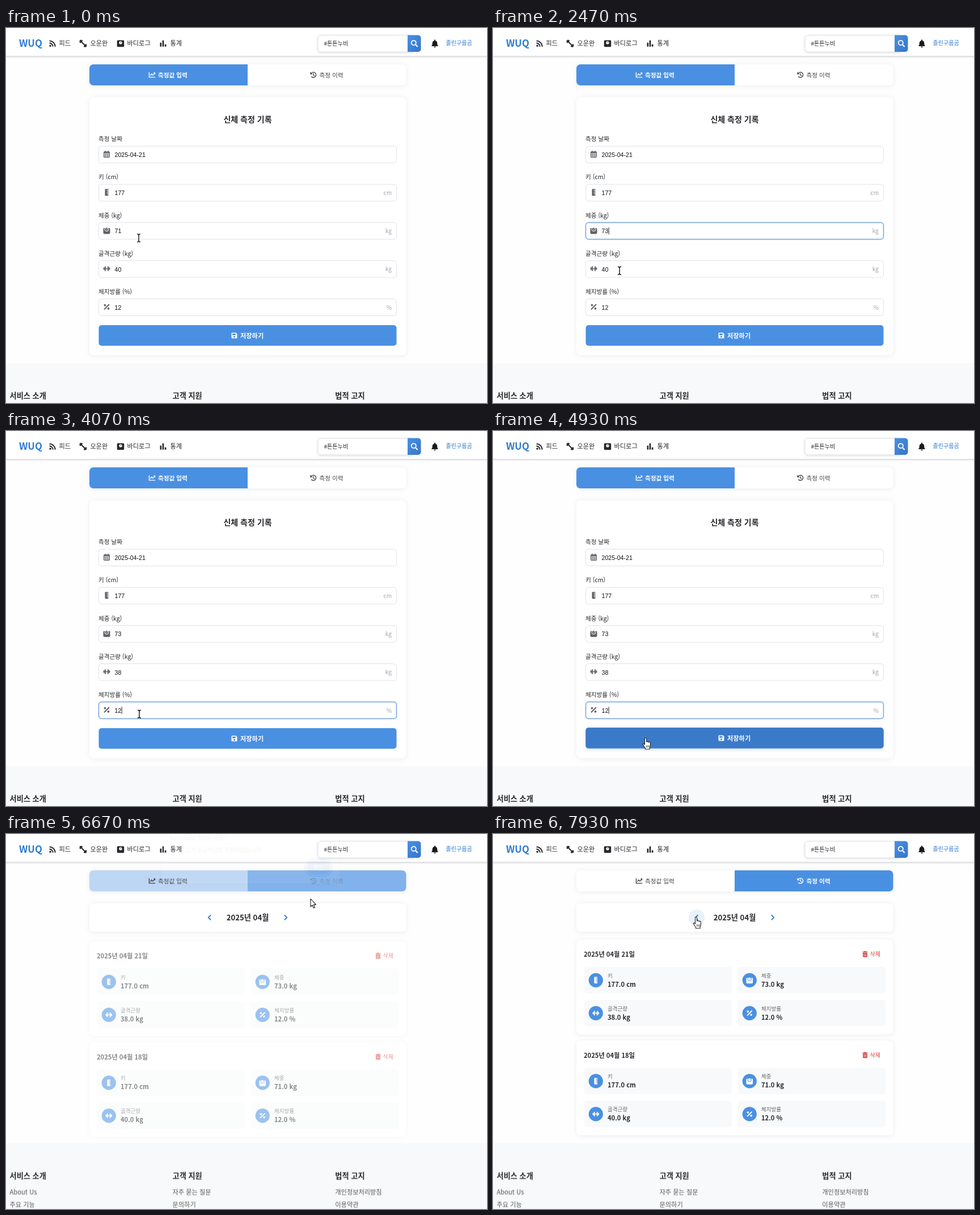
Write an HTML page that moves like this. It is 848 by 660 pixels and loops after 8000 ms.

```html
<!DOCTYPE html>
<html lang="ko">
<head>
<meta charset="utf-8">
<title>신체 측정 기록</title>
<style>
html, body { margin: 0; width: 100%; height: 100%; overflow: hidden; background: #fefefe; }
svg { display: block; width: 100vw; height: 100vh; }
text { font-family: "Noto Sans CJK KR", "Noto Sans CJK", "Noto Sans", sans-serif; white-space: pre; }
.value { font-family: "Liberation Sans", Arial, sans-serif; }
.line { fill: none; stroke: currentColor; stroke-width: 2; }
.card { fill: #fff; filter: drop-shadow(0 1px 4px rgba(20, 20, 60, .075)); }
.field { fill: #fff; stroke: #e0e2e8; }
.pop { fill: #fff; stroke: #d2d4d8; stroke-width: .7; filter: drop-shadow(0 2px 4px rgba(0, 0, 0, .28)); }
</style>
</head>
<body>
<svg id="stage" viewBox="0 0 848 660"></svg>
<script>
const LOOP = 8000, SWITCH = 6540;
const BLUE = '#4a90e2', DARK = '#26282c', GRAY = '#666';
const rules = [];

// Builds a looping keyframe rule from [ms, css] steps and wraps the content in it.
function animate(steps, content, ease = 'linear') {
  const name = `k${rules.length}`;
  const all = [...steps, [LOOP, steps.at(-1)[1]]];
  rules.push(`@keyframes ${name}{${all.map(([ms, css]) => `${ms / LOOP * 100}%{${css}}`).join('')}}`);
  return `<g style="animation:${name} ${LOOP}ms ${ease} infinite">${content}</g>`;
}
const shown = (from, to, content) =>
  animate([[0, 'opacity:0'], [from, 'opacity:1'], [to, 'opacity:0']], content, 'step-end');
const fade = (steps, content) => animate(steps.map(([ms, o]) => [ms, `opacity:${o}`]), content);
const slide = (steps, content) => animate(
  steps.map(([ms, o, y]) => [ms, `opacity:${o};transform:translate(0px,${y}px)`]), content);

// Text is placed by its left edge and the middle of its line.
const text = (x, y, size, str, fill = DARK, weight = 400, more = '') =>
  `<text x="${x}" y="${y + size * .37}" font-size="${size}" fill="${fill}" font-weight="${weight}" ${more}>${str}</text>`;
const rect = (x, y, w, h, r, more) =>
  `<rect x="${x}" y="${y}" width="${w}" height="${h}" rx="${r}" ${more}/>`;
const path = (d, more = '') => `<path d="${d}" ${more}/>`;
const line = (d, width = 2) => path(d, `class="line" style="stroke-width:${width}"`);
const dot = (x, y, r, more = '') => `<circle cx="${x}" cy="${y}" r="${r}" ${more}/>`;

// Icons live in a box from -8 to 8.
const icons = {
  feed: dot(-5, 5, 2.2) + line('M-7-1A8 8 0 0 1 1 7M-7-6A13 13 0 0 1 6 7', 2.5),
  lift: line('M-4-4L4 4', 2.6) + line('M-7.5-2L-2-7.5M2 7.5L7.5 2', 3.4) + line('M-8-5L-5-8M5 8L8 5', 2),
  body: rect(-8, -7.5, 16, 15, 2, '') + dot(0, -1.8, 3.4, 'fill="#fff"') + line('M0-1.5L1-4', 1.2),
  bars: path('M-7-2h3.4v9h-3.4zM-1.7-7h3.4v14h-3.4zM3.6 2H7v5H3.6z'),
  search: '<circle cx="-1.5" cy="-1.5" r="5" class="line" style="stroke-width:2.2"/>' + line('M2 2L7 7', 2.6),
  bell: path('M-1-8h2v2C5-5 5-1 5 1Q5 3 7 5H-7Q-5 3-5 1C-5-1-5-5-1-6zM-2 6H2A2 2 0 0 1-2 6z'),
  chart: line('M-7-6V6H8') + line('M-4 2L-1-2L2 1L7-4') + path('M3-5.5h5v5z'),
  history: line('M-5.2-3.5A6.4 6.4 0 1 1-5 4.2', 2) + path('M-8-7v6h6z') + line('M0-4V.5L3 3', 1.8),
  calendar: rect(-6.5, -5.5, 13, 13, 1.5, 'class="line" style="stroke-width:1.7"') +
    line('M-6-3.5H6', 3) + line('M-3.5-8v3M3.5-8v3') + line('M-6 1H6M-6 4.4H6M-2.2-2V7M2.2-2V7', 1.2),
  ruler: rect(-4, -8, 8, 16, 1.4, '') + path('M0-5.6H4v1.2H0zM1-2.6H4v1.2H1zM0 .4H4v1.2H0zM1 3.4H4v1.2H1z', 'fill="var(--back)"'),
  scale: rect(-8, -6, 16, 14, 2.4, '') + dot(0, -3, 5, 'fill="var(--back)"') + dot(0, -3, 3.7) +
    path('M-.6-2L1.4-6L2-5.6L.8-1.6z', 'fill="var(--back)"'),
  dumbbell: line('M-8 0H8') + line('M-6.4-3v6M6.4-3v6', 2.2) + line('M-3.4-5.5v11M3.4-5.5v11', 2.6),
  percent: line('M-6 6L6-6', 2.6) + line('M-6.5-4h5M-4-6.5v5M1.5 4h5M4 1.5v5', 2.6),
  save: path('M-7-5Q-7-7-5-7H4L7-4V5Q7 7 5 7H-5Q-7 7-7 5z') + path('M-4.6-4.8H3V-1H-4.6z', 'fill="var(--back)"') + dot(0, 3, 2.1, 'fill="var(--back)"'),
  trash: path('M-7-6.5h4L-2-8H2L3-6.5H7v2H-7zM-6-3.5H6V6.5Q6 8 4.5 8h-9Q-6 8-6 6.5z') + path('M-3-1v6.5M0-1v6.5M3-1v6.5', 'stroke="#fff" stroke-width="1.1"'),
  prev: line('M3-6L-3 0L3 6', 2.4),
  next: line('M-3-6L3 0L-3 6', 2.4)
};
const icon = (name, x, y, size, color = DARK, back = '#fff') =>
  `<g transform="translate(${x} ${y}) scale(${size / 16})" fill="${color}" style="color:${color};--back:${back}">${icons[name]}</g>`;

const header = () => rect(0, 0, 848, 50, 0, 'fill="#fff"') +
  rect(0, 49.5, 848, 1, 0, 'fill="#b9bac0"') + rect(0, 50.5, 848, 2, 0, 'fill="#f0f0f3"') +
  text(23, 27, 16.8, 'WUQ', '#2d7bd2', 700) +
  [['feed', 82, '피드', 93.5], ['lift', 136, '오운완', 148.5], ['body', 202, '바디로그', 213.5], ['bars', 277, '통계', 289.5]]
    .map(([name, x, label, tx]) => icon(name, x, 27.3, 12.5) + text(tx, 26.7, 11.2, label, DARK, 500)).join('') +
  rect(550, 13, 170, 29, 5, 'fill="#fff" stroke="#dfe1e6" style="filter:drop-shadow(0 1px 2px rgba(0,0,0,.13))"') +
  path('M708 12.5h18.5a5 5 0 0 1 5 5v19.5a5 5 0 0 1-5 5H708z', 'fill="url(#search)"') +
  icon('search', 720, 27.3, 13, '#fff') + text(560.5, 27.5, 10.08, '#튼튼누비') +
  icon('bell', 756, 27.5, 14, '#18191b') + text(775.5, 26.7, 10.08, '졸린구름곰', '#2d7bd2', 500);

const tabLabel = (name, x, label, color, weight) =>
  icon(name, x, 82.3, 11.5, color) + text(x + 10.5, 82.7, 10.64, label, color, weight);
const tabs = () => rect(147, 64, 558.5, 37, 7, 'class="card"') +
  fade([[0, 1], [SWITCH, 1], [6670, .37], [6750, 0]],
    path('M154 64H426V101H154a7 7 0 0 1-7-7V71a7 7 0 0 1 7-7z', `fill="${BLUE}"`)) +
  fade([[0, 0], [SWITCH, 0], [6670, .69], [6750, 1]],
    path('M426 64H698.5a7 7 0 0 1 7 7V94a7 7 0 0 1-7 7H426z', `fill="${BLUE}"`)) +
  shown(0, SWITCH, tabLabel('chart', 257.5, '측정값 입력', '#fff', 700)) +
  shown(SWITCH, LOOP, tabLabel('chart', 257.5, '측정값 입력', '#444', 400)) +
  fade([[0, 1], [SWITCH, 1], [6670, .3], [6750, 0]], tabLabel('history', 542, '측정 이력', '#444', 400)) +
  fade([[0, 0], [6670, 0], [6790, 1]], tabLabel('history', 542, '측정 이력', '#fff', 700));

const fieldTop = i => 208 + i * 67.2;
const value = (i, str) => text(191.5, fieldTop(i) + 15, 10.64, str, '#111', 400, 'class="value"');
const caret = (i, x, from, to) => shown(from, to, rect(x, fieldTop(i) + 8.5, .9, 12.5, 0, 'fill="#111"'));
const focus = (i, steps) => fade(steps,
  rect(163.5, fieldTop(i), 525, 29.5, 5, `fill="none" stroke="${BLUE}" stroke-opacity=".28" stroke-width="2.6"`) +
  rect(163.5, fieldTop(i), 525, 29.5, 5, 'fill="none" stroke="#7ba6de"'));
const field = (i, label, name, unit) => {
  const y = fieldTop(i);
  return text(163, y - 12.7, 10.64, label, DARK, 500) +
    rect(163.5, y, 525, 29.5, 5, 'class="field"') + icon(name, 177.5, y + 14, 12, '#606266') +
    text(680, y + 15, 10.08, unit, '#a2a4aa', 400, 'text-anchor="end"');
};
const button = fill => rect(163.5, 523, 525, 36.3, 5, `fill="${fill}"`);
const saveLabel = back => icon('save', 402.5, 541.3, 11.5, '#fff', back) + text(413, 541.7, 11.2, '저장하기', '#fff', 700);

const form = () => rect(147, 122, 558.5, 454, 8, 'class="card"') +
  text(426, 161, 14, '신체 측정 기록', DARK, 700, 'text-anchor="middle"') +
  field(0, '측정 날짜', 'calendar', '') + field(1, '키 (cm)', 'ruler', 'cm') +
  field(2, '체중 (kg)', 'scale', 'kg') + field(3, '골격근량 (kg)', 'dumbbell', 'kg') +
  field(4, '체지방률 (%)', 'percent', '%') +
  focus(2, [[0, 0], [520, 0], [670, 1], [2790, 1], [2930, 0]]) +
  focus(3, [[0, 0], [2790, 0], [2930, 1], [3660, 1], [3800, 0]]) +
  focus(4, [[0, 0], [3660, 0], [3800, 1], [5600, 1], [5850, .22], [6000, 0]]) +
  value(0, '2025-04-21') + value(1, '177') + value(4, '12') +
  shown(0, 1870, value(2, '71')) + shown(1870, 2070, value(2, '7')) + shown(2070, LOOP, value(2, '73')) +
  shown(0, 3070, value(3, '40')) + shown(3070, 3130, value(3, '4')) +
  shown(3270, 3400, value(3, '3')) + shown(3400, LOOP, value(3, '38')) +
  caret(2, 203.7, 600, 1100) + caret(2, 203.7, 1600, 1870) + caret(2, 197.8, 1870, 2070) + caret(2, 203.7, 2070, 2800) +
  caret(3, 203.7, 2800, 3070) + caret(3, 197.8, 3070, 3130) + caret(3, 191.8, 3130, 3270) +
  caret(3, 197.8, 3270, 3400) + caret(3, 203.7, 3400, 3670) + caret(4, 203.7, 3670, 5600) +
  animate([[0, 'transform:translate(0px,0px)'], [4660, 'transform:translate(0px,0px)'],
    [4860, 'transform:translate(0px,-.8px)'], [5400, 'transform:translate(0px,-.8px)'], [5470, 'transform:translate(0px,0px)']],
    button(BLUE) +
    fade([[0, 0], [4660, 0], [4860, 1]],
      `<g style="filter:drop-shadow(0 2px 3px rgba(40,90,160,.2))">${button('#3a7ac8')}</g>`) +
    fade([[0, 0], [5470, 0], [5670, 1]], button('#4882c8')) +
    shown(0, 5470, saveLabel('#3f82d2')) +
    shown(5470, LOOP, text(426, 541.7, 11.2, '저장 중...', '#fff', 700, 'text-anchor="middle"')));

const tile = (x, y, name, label, amount) => rect(x, y, 260, 46.5, 5, 'fill="#f8f9fa"') +
  dot(x + 20.3, y + 23.3, 12.6, `fill="${BLUE}"`) + icon(name, x + 20.3, y + 23.3, 11.5, '#fff', BLUE) +
  text(x + 41, y + 15, 9.52, label, GRAY) + text(x + 41, y + 30.5, 11.2, amount, DARK, 700);
const record = (y, date, weight, muscle) => rect(147, y, 558.5, 166.5, 8, 'class="card"') +
  text(160, y + 26, 11.2, date, DARK, 700) +
  icon('trash', 656, y + 25.3, 10.5, '#d9403c') + text(664.5, y + 25.7, 10.08, '삭제', '#d9403c') +
  tile(161, y + 48, 'ruler', '키', '177.0 cm') + tile(432, y + 48, 'scale', '체중', weight) +
  tile(161, y + 106, 'dumbbell', '골격근량', muscle) + tile(432, y + 106, 'percent', '체지방률', '12.0 %');

const log = () => rect(147, 122, 558.5, 50, 7, 'class="card"') +
  fade([[0, 0], [7660, 0], [7840, 1]], dot(359, 147, 14, 'fill="#e9f1fa"')) +
  icon('prev', 359, 147, 12, '#3280d6') + icon('next', 493, 147, 12, '#3280d6') +
  text(426, 147.5, 13.2, '2025년 04월', DARK, 700, 'text-anchor="middle"') +
  slide([[0, 0, 7], [SWITCH, 0, 7], [6670, .55, 2.9], [6870, 1, 0]],
    record(186, '2025년 04월 21일', '73.0 kg', '38.0 kg') +
    record(363.6, '2025년 04월 18일', '71.0 kg', '40.0 kg'));

const footer = () => rect(0, 590, 848, 130, 0, 'fill="#f8f9fa"') +
  [[6.5, '서비스 소개', 'About Us', '주요 기능'], [293.5, '고객 지원', '자주 묻는 질문', '문의하기'], [580.3, '법적 고지', '개인정보처리방침', '이용약관']]
    .map(([x, title, a, b]) => text(x, 646.7, 13.2, title, DARK, 700) +
      text(x, 675.5, 11.2, a, '#555') + text(x, 697.5, 11.2, b, '#555')).join('');

const dialog = () => slide([[0, 0, -12], [5600, 0, -12], [5800, 1, 0], [6500, 1, 0], [6670, .06, -12], [6710, 0, -13]],
  rect(274, -20, 314, 119, 8, 'class="pop"') +
  text(288.5, 19, 10.8, 'localhost:3000 내용:', '#303134') +
  text(288.5, 40, 9.9, '바디로그가 성공적으로 저장되었습니다!', '#202124') +
  rect(527, 56, 48, 30.5, 15.2, 'fill="#fff" stroke="#0b57c4" stroke-width="2"') +
  rect(529.5, 58.5, 43, 25.5, 12.7, 'fill="#0b4fb5"') +
  text(551, 71.2, 10, '확인', '#fff', 500, 'text-anchor="middle"'));

const ibeam = line('M-3-6.7Q0-6.7 0-5V5.3Q0 7 -3 7M3-6.7Q0-6.7 0-5M0 5.3Q0 7 3 7', 3).replace('class="line"', 'class="line" stroke-opacity=".0"') +
  path('M-3-6.7Q0-6.7 0-5V5.3Q0 7-3 7M3-6.7Q0-6.7 0-5M0 5.3Q0 7 3 7', 'fill="none" stroke="#111" stroke-width="1.4"');
const hand = path('M-3.5 2V-8.5a1.5 1.5 0 0 1 3 0V-3q1.2-1 2.3.2q1.3-.8 2.2.4q2.2-.5 2.4 1.6V4q0 2-1.2 3.5V10H-2.5V8Q-5 5-6.6 1.8q-.3-1.8 1.4-1.4z',
  'fill="#fff" stroke="#222" stroke-width="1.1" stroke-linejoin="round"') +
  path('M-.2 3V7M2 3V7M4.2 3V7', 'stroke="#222" stroke-width=".8"');
const blocked = dot(0, 0, 6, 'fill="#fff" stroke="#d8232a" stroke-width="2.2"') +
  path('M-4.2-4.2L4.2 4.2', 'stroke="#d8232a" stroke-width="2.2"');
const arrow = path('M-4-8V6L-.9 3.2L1.3 8.3L3.5 7.3L1.3 2.4H5.4z', 'fill="#fff" stroke="#222" stroke-width="1.1" stroke-linejoin="round"');

const route = [
  [0, 234, 369.5], [870, 234, 369.5], [1130, 227, 365], [2070, 227, 365], [2470, 223, 427],
  [3400, 223, 427], [3600, 229, 482], [3930, 235, 498], [4400, 235, 498], [4600, 246, 516],
  [4900, 271, 550], [5530, 271, 550], [5700, 390, 375], [5870, 502, 211], [6060, 541, 105],
  [6200, 547, 80], [6480, 547, 80], [6640, 541, 122], [7130, 541, 122], [7350, 470, 136],
  [7650, 377, 152], [7860, 360, 156]
];
const cursor = () => animate(route.map(([ms, x, y]) => [ms, `transform:translate(${x}px,${y}px)`]),
  shown(0, 4660, ibeam) + shown(4660, 5530, hand) + shown(5530, 6060, blocked) +
  shown(6060, 7660, arrow) + shown(7660, LOOP, hand));

document.getElementById('stage').innerHTML =
  `<defs><linearGradient id="search" x2="1" y2="1"><stop stop-color="${BLUE}"/><stop offset="1" stop-color="#3575cb"/></linearGradient></defs>` +
  rect(0, 0, 848, 660, 0, 'fill="#fefefe"') + header() + tabs() +
  shown(0, SWITCH, form()) + shown(SWITCH, LOOP, log()) +
  animate([[0, 'transform:translate(0px,0px)'], [SWITCH, 'transform:translate(0px,-45.5px)']], footer(), 'step-end') +
  dialog() + cursor();
document.head.appendChild(document.createElement('style')).textContent = rules.join('\n');
</script>
</body>
</html>
```
